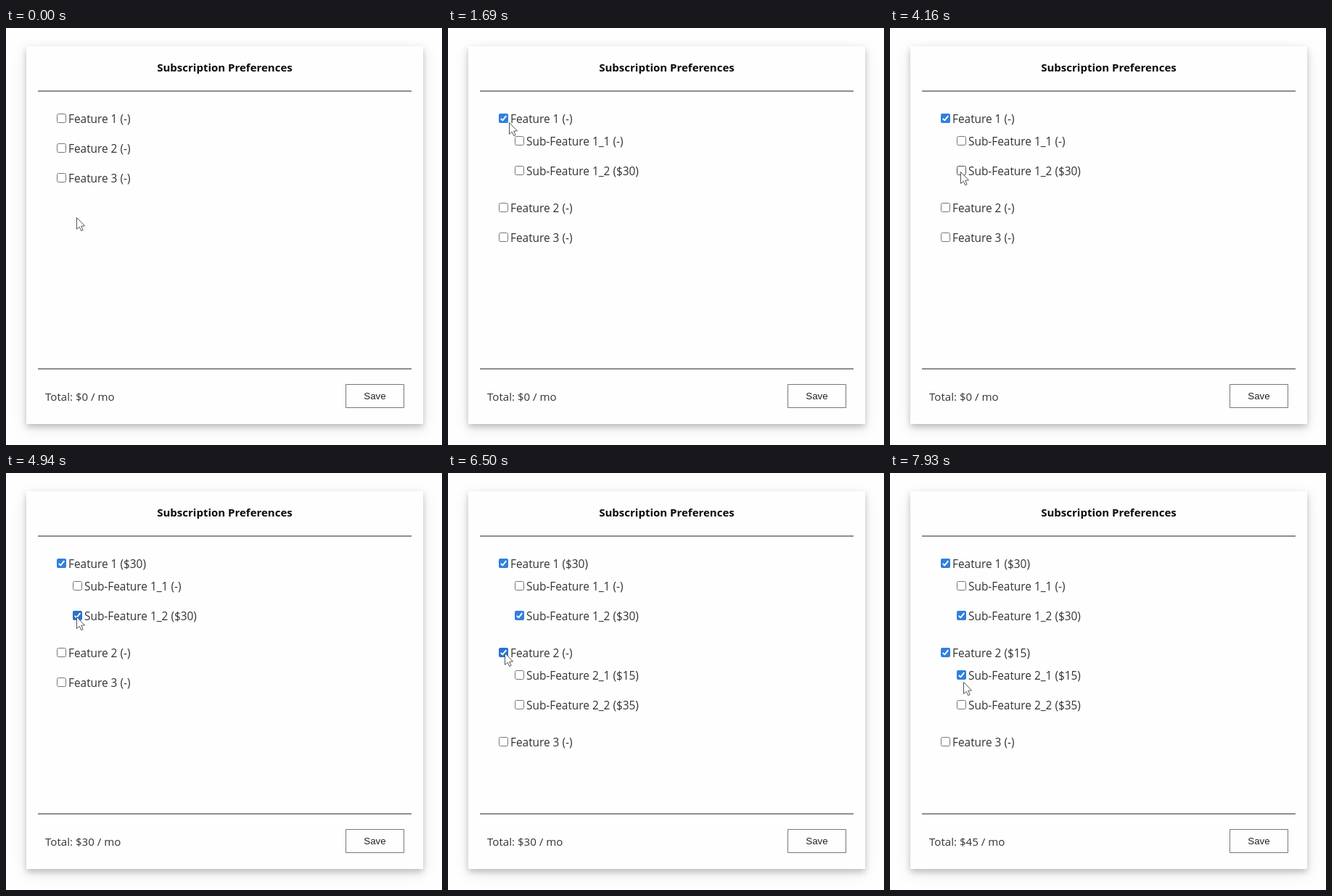
Recreate the animation shown at these times as an HTML page with a canvas. Size 601 px wide and 575 px high, loop 8000 ms.

```html
<!DOCTYPE html>
<html lang="en">
<head>
<meta charset="utf-8">
<title>Subscription Preferences</title>
<style>
  html, body { margin: 0; width: 100%; height: 100%; overflow: hidden; background: #fefefe; }
  canvas { display: block; width: 601px; height: 575px; }
</style>
</head>
<body>
<canvas id="stage"></canvas>
<script>
const W = 601, H = 575, LOOP = 8000, TICK = 130;
const canvas = document.getElementById('stage');
const ctx = canvas.getContext('2d');
const ratio = window.devicePixelRatio || 1;
canvas.width = W * ratio;
canvas.height = H * ratio;

const SANS = '"Open Sans", "Noto Sans", sans-serif';

// Moments at which boxes become checked
const CLICK = { first: 1430, second: 4680, third: 6370, fourth: 7540 };

const FEATURES = [
  { name: '1', at: CLICK.first, subs: [
    { name: '1_1', price: 0, at: Infinity },
    { name: '1_2', price: 30, at: CLICK.second }] },
  { name: '2', at: CLICK.third, subs: [
    { name: '2_1', price: 15, at: CLICK.fourth },
    { name: '2_2', price: 35, at: Infinity }] },
  { name: '3', at: Infinity, subs: [] }
];

// Pointer stops: time, x, y
const PATH = [
  [0, 97, 261], [780, 80, 121], [1430, 80, 121], [1690, 84, 130],
  [2080, 91, 142], [2470, 91, 142], [2860, 101, 160], [3640, 101, 160],
  [4160, 97, 198], [5070, 97, 198], [5720, 74, 259], [6110, 78, 248],
  [6760, 78, 248], [7280, 101, 279], [7670, 101, 279], [7800, 101, 288],
  [LOOP, 101, 288]
];

const ARROW = [[0, 0], [0, 16], [3.7, 12.7], [6.2, 18.2], [8.6, 17.1], [6.2, 11.7], [11, 11.4]];

function pointerAt(t) {
  const i = Math.max(1, PATH.findIndex(p => p[0] > t));
  const [t0, x0, y0] = PATH[i - 1], [t1, x1, y1] = PATH[i];
  const k = (t - t0) / (t1 - t0), ease = k * k * (3 - 2 * k);
  return { x: x0 + (x1 - x0) * ease, y: y0 + (y1 - y0) * ease };
}

function text(str, x, y, font, color = '#333', align = 'left') {
  ctx.font = font;
  ctx.fillStyle = color;
  ctx.textAlign = align;
  ctx.fillText(str, x, y);
}

function shadow(y, blur, alpha) {
  ctx.save();
  ctx.shadowColor = `rgba(0,0,0,${alpha})`;
  ctx.shadowOffsetY = y * ratio;
  ctx.shadowBlur = blur * ratio;
  ctx.fillStyle = '#fefefe';
  ctx.fillRect(28, 25, 547, 521);
  ctx.restore();
}

function drawFrame(total) {
  ctx.fillStyle = '#fefefe';
  ctx.fillRect(0, 0, W, H);
  shadow(6, 20, 0.1);
  shadow(4, 8, 0.2);
  text('Subscription Preferences', 301.5, 60, `bold 15px ${SANS}`, '#0a0a0a', 'center');
  ctx.fillStyle = '#8e8e90';
  ctx.fillRect(44, 86, 515, 2);
  ctx.fillRect(44, 469, 515, 2);
  text(`Total: $${total} / mo`, 54, 514, `15.1px ${SANS}`);
  ctx.strokeStyle = '#777';
  ctx.lineWidth = 1;
  ctx.strokeRect(468.5, 491.5, 80, 32);
  text('Save', 508.5, 512, '13.33px "Liberation Sans", Arial, sans-serif', '#222', 'center');
}

function roundBox(x, y, size, r) {
  ctx.beginPath();
  ctx.moveTo(x + r, y);
  ctx.arcTo(x + size, y, x + size, y + size, r);
  ctx.arcTo(x + size, y + size, x, y + size, r);
  ctx.arcTo(x, y + size, x, y, r);
  ctx.arcTo(x, y, x + size, y, r);
  ctx.closePath();
}

function checkbox(x, y, checked, pointer) {
  const over = pointer.x >= x && pointer.x <= x + 13 && pointer.y >= y && pointer.y <= y + 13;
  if (checked) {
    roundBox(x, y, 13, 2);
    ctx.fillStyle = over ? '#2873cf' : '#3080de';
    ctx.fill();
    ctx.beginPath();
    ctx.moveTo(x + 2.8, y + 6.8);
    ctx.lineTo(x + 5.3, y + 9.3);
    ctx.lineTo(x + 10.3, y + 3.2);
    ctx.strokeStyle = '#fff';
    ctx.lineWidth = 1.9;
  } else {
    roundBox(x + 0.5, y + 0.5, 12, 2);
    ctx.fillStyle = '#fff';
    ctx.fill();
    ctx.strokeStyle = over ? '#4f4f4f' : '#777';
    ctx.lineWidth = 1;
  }
  ctx.stroke();
}

function row(x, y, label, price, checked, pointer) {
  checkbox(x, y, checked, pointer);
  text(`${label} (${price ? '$' + price : '-'})`, x + 16, y + 13, `15.4px ${SANS}`);
}

function outline() {
  ctx.fillStyle = '#fff';
  ctx.strokeStyle = '#555';
  ctx.lineWidth = 1;
  ctx.lineJoin = 'round';
  ctx.fill();
  ctx.stroke();
}

function drawArrow() {
  ctx.beginPath();
  ARROW.forEach(([x, y]) => ctx.lineTo(x + 0.5, y + 0.5));
  ctx.closePath();
  outline();
}

function drawHand() {
  ctx.beginPath();
  ctx.moveTo(-1.5, 12);
  ctx.lineTo(-1.5, 1.5);
  ctx.quadraticCurveTo(0, -0.7, 1.5, 1.5);
  ctx.lineTo(1.5, 6);
  ctx.quadraticCurveTo(3.5, 4.6, 4.5, 6.6);
  ctx.quadraticCurveTo(6.5, 5.4, 7.3, 7.4);
  ctx.quadraticCurveTo(9.7, 6.6, 9.8, 9);
  ctx.lineTo(9.5, 14);
  ctx.lineTo(7.8, 17.5);
  ctx.lineTo(7.8, 20.5);
  ctx.lineTo(-0.8, 20.5);
  ctx.lineTo(-1, 18);
  ctx.lineTo(-5.6, 11.5);
  ctx.quadraticCurveTo(-5.5, 9, -3, 10.5);
  ctx.closePath();
  outline();
  ctx.beginPath();
  [1.5, 4.5, 7.3].forEach((x, i) => {
    ctx.moveTo(x, 6 + i * 0.6);
    ctx.lineTo(x, 10.5);
  });
  ctx.stroke();
}

function draw(t) {
  const pointer = pointerAt(t);
  const cost = f => f.subs.reduce((sum, s) => sum + (t >= s.at ? s.price : 0), 0);
  ctx.setTransform(ratio, 0, 0, ratio, 0, 0);
  drawFrame(FEATURES.reduce((sum, f) => sum + cost(f), 0));

  let y = 118;
  for (const f of FEATURES) {
    const open = t >= f.at;
    row(70, y, `Feature ${f.name}`, cost(f), open, pointer);
    if (open) {
      f.subs.forEach((s, i) =>
        row(92, y + 31 + i * 41, `Sub-Feature ${s.name}`, s.price, t >= s.at, pointer));
    }
    y += open ? 123 : 41;
  }

  ctx.translate(Math.round(pointer.x), Math.round(pointer.y));
  if (t >= 5460 && t < 5980) drawHand();
  else drawArrow();
}

function loop(now) {
  const t = now % LOOP;
  draw(Math.floor(t / TICK) * TICK);
  requestAnimationFrame(loop);
}
draw(0);
requestAnimationFrame(loop);
</script>
</body>
</html>
```
